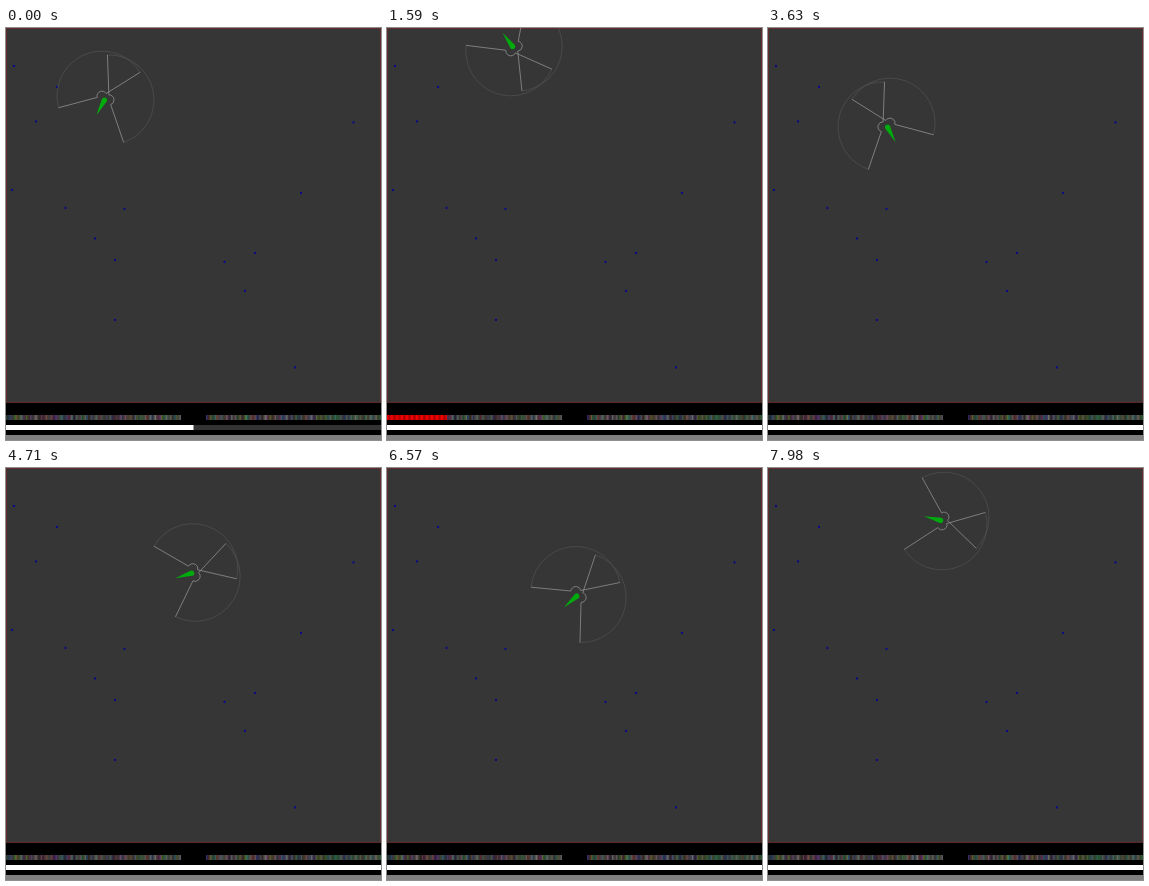
Write an HTML page with a canvas that moves like this. It is 375 px wide and 412 px high and loops after 8000 ms.

```html
<!DOCTYPE html>
<html lang="en">
<head>
<meta charset="utf-8">
<title>Wandering agent</title>
<style>
  html, body { margin: 0; width: 100%; height: 100%; overflow: hidden; background: #000; }
  canvas { display: block; width: 375px; height: 412px; }
</style>
</head>
<body>
<canvas id="stage" width="375" height="412"></canvas>
<script>
const ctx = document.getElementById('stage').getContext('2d');
const LOOP = 8000, STEP = 30, SPEED = 0.2, RAD = Math.PI / 180;

const food = [
  [8, 38], [51, 59], [30, 93.5], [347.5, 94.5], [6, 162], [295, 165], [59.5, 180], [118.5, 181],
  [89, 210.5], [249, 225], [109, 232], [218.5, 234], [239, 263], [109, 292], [289, 339.5]
];

// Key poses: time, x, y, heading in degrees
const route = [
  [0, 99.5, 70, -62], [1590, 127, 20.5, 54], [2490, 149, 58, 74], [3630, 118.5, 97, -118],
  [4710, 188, 104.5, -17], [6570, 191.5, 126.5, -41.5], [7980, 175, 53, 14]
];

// The agent leaves and meets each key pose at SPEED, always facing along its path.
function poseAt(t) {
  let i = 0;
  while (i < route.length - 2 && t >= route[i + 1][0]) i++;
  const [t0, x0, y0, a0] = route[i], [t1, x1, y1, a1] = route[i + 1];
  const u = Math.min(1, (t - t0) / (t1 - t0));
  const pull = SPEED * (t1 - t0);
  const curve = (p, q, m, n) => {
    const c = 3 * (q - p) - 2 * m - n, d = 2 * (p - q) + m + n;
    return [p + u * (m + u * (c + u * d)), m + u * (2 * c + 3 * u * d)];
  };
  const [x, dx] = curve(x0, x1, pull * Math.cos(a0 * RAD), pull * Math.cos(a1 * RAD));
  const [y, dy] = curve(y0, y1, pull * Math.sin(a0 * RAD), pull * Math.sin(a1 * RAD));
  return { x, y, heading: Math.atan2(dy, dx) };
}

function rect(color, x, y, w, h) {
  ctx.fillStyle = color;
  ctx.fillRect(x, y, w, h);
}

function arc(color, x, y, r, from, to) {
  ctx.strokeStyle = color;
  ctx.beginPath();
  ctx.arc(x, y, r, from, to);
  ctx.stroke();
}

// An ear senses a ring sector; side is -1 for left, 1 for right.
function drawEar(side) {
  const y = side * 4, inner = -side * 30 * RAD, outer = side * 133 * RAD;
  const from = Math.min(inner, outer), to = Math.max(inner, outer);
  arc('#525252', 0, y, 45, from, to);
  arc('#9a9a9a', 0, y, 5, from, to);
  ctx.beginPath();
  for (const a of [inner, outer]) {
    ctx.moveTo(5 * Math.cos(a), y + 5 * Math.sin(a));
    ctx.lineTo(45 * Math.cos(a), y + 45 * Math.sin(a));
  }
  ctx.stroke();
}

function drawAgent({ x, y, heading }) {
  ctx.save();
  ctx.beginPath();
  ctx.rect(0, 0, 375, 375);
  ctx.clip();
  ctx.translate(x, y);
  ctx.rotate(heading);
  ctx.lineWidth = 0.65;
  drawEar(-1);
  drawEar(1);
  ctx.fillStyle = '#00aa0c';
  ctx.beginPath();
  ctx.moveTo(-19.5, 0);
  ctx.lineTo(-3, -2.7);
  ctx.arc(-2.5, 0, 2.7, -Math.PI / 2, Math.PI / 2);
  ctx.closePath();
  ctx.fill();
  ctx.restore();
}

function random(a, b) {
  const s = Math.sin(a * 12.9898 + b * 78.233) * 43758.5453;
  return s - Math.floor(s);
}

function drawNeurons(frame, alarm) {
  const width = 1.25;
  for (let i = 0; i < 375 / width; i++) {
    const x = i * width;
    if (x >= 175 && x < 200) continue;
    const level = 50 + 20 * random(i, 1) + 15 * random(i, frame + 9);
    const [r, g, b] = [2, 3, 4].map(k => Math.round(level + 60 * (random(i >> 1, k) - 0.4)));
    const red = 225 + Math.round(30 * random(i, frame));
    rect(alarm && x < 59 ? `rgb(${red},0,0)` : `rgb(${r},${g},${b})`, x, 387, width, 5);
  }
}

function draw(t) {
  const frame = Math.floor(t / STEP), time = frame * STEP;
  rect('#000', 0, 0, 375, 412);
  rect('#363636', 0, 0, 375, 374.6);
  ctx.lineWidth = 1;
  ctx.strokeStyle = '#642e2e';
  ctx.strokeRect(0.5, 0.5, 374, 373.8);
  ctx.fillStyle = '#0a0a86';
  for (const [x, y] of food) {
    ctx.beginPath();
    ctx.arc(x, y, 1.15, 0, 2 * Math.PI);
    ctx.fill();
  }
  drawAgent(poseAt(time));
  drawNeurons(frame, time >= 1500 && time < 1740);
  rect('#333', 0, 397, 375, 5);
  rect('#fff', 0, 397, time < STEP ? 187.5 : 375, 5);
  rect('#808080', 0, 407, 375, 5);
}

const start = performance.now();
function tick() {
  draw((performance.now() - start) % LOOP);
  requestAnimationFrame(tick);
}
tick();
</script>
</body>
</html>
```
